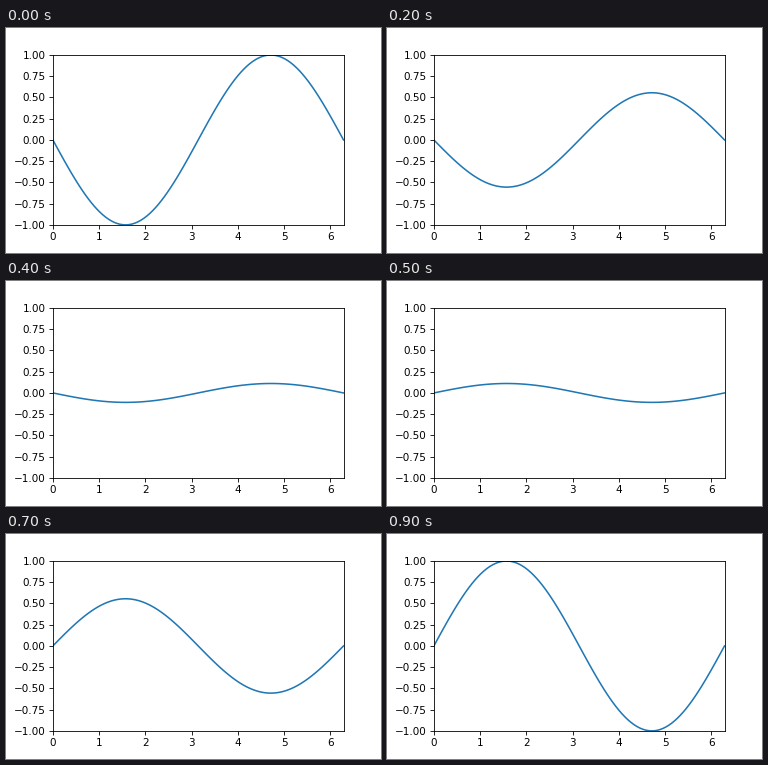
A matplotlib script for the animation above (1 s loop, 375 px wide and 225 px high).

```python
import numpy as np
import matplotlib.pyplot as plt
from matplotlib.animation import FuncAnimation

FRAMES = 10
INTERVAL = 100  # ms

x = np.linspace(0, 2 * np.pi, 100)
amplitudes = np.linspace(-1, 1, FRAMES)

fig, ax = plt.subplots(figsize=(5, 3), dpi=75)
fig.subplots_adjust(left=0.125, right=0.9, bottom=0.125, top=0.88)
ax.set_xlim(0, 2 * np.pi)
ax.set_ylim(-1, 1)
ax.set_xticks(range(7))
ax.set_yticks(np.linspace(-1, 1, 9))
line, = ax.plot(x, amplitudes[0] * np.sin(x), color="#1f77b4", lw=1.5)


def update(frame):
    line.set_ydata(amplitudes[frame] * np.sin(x))
    return line,


anim = FuncAnimation(fig, update, frames=FRAMES, interval=INTERVAL,
                     repeat=True, repeat_delay=0)
plt.show()
```
